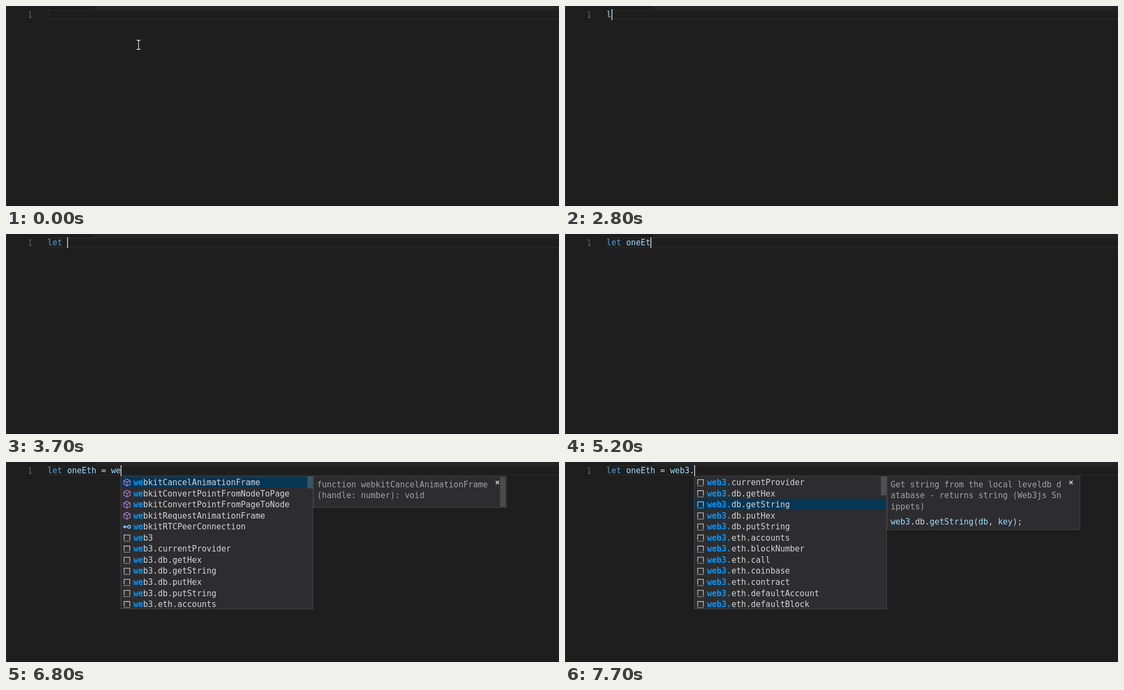
Animation of 1024x371 px, one loop 8 s. Source, as an HTML page:

```html
<!DOCTYPE html>
<html lang="en">
<head>
<meta charset="utf-8">
<title>Editor autocomplete</title>
<style>
  html, body { margin: 0; width: 100%; height: 100%; overflow: hidden; background: #1e1e1e; }
  svg { display: block; }
  text { font: 15px "DejaVu Sans Mono", monospace; white-space: pre; fill: #d4d4d4; }
  .match { font-weight: bold; fill: #0097fb; }
  .box { fill: #2d2d30; stroke: #454545; }
  .dim { fill: #a2a2a3; }
  .kw { fill: #569cd6; }
  .id { fill: #9cdcfe; }
</style>
</head>
<body>
<svg width="1024" height="371" viewBox="0 0 1024 371">
  <defs>
    <clipPath id="list"><rect x="1" y="27" width="355" height="245"/></clipPath>
    <g id="keyword" fill="none" stroke="#c5c5c5" stroke-width="1.4">
      <path d="M0 1.5H8M10 1.5H14M0 4.7H3M5 4.7H10M0 8H6M8 8H14M0 11.3H4M6 11.3H12"/>
    </g>
    <g id="field">
      <path d="M3 2H.7V11H3M11.5 2H13.8V11H11.5" fill="none" stroke="#c5c5c5" stroke-width="1.3"/>
      <path d="M3.5 6L8 3.2 11 4.6V7.2L6.5 9.8 3.5 8.4Z" fill="#75beff"/>
    </g>
    <g id="type" fill="none" stroke="#75beff" stroke-width="1.8">
      <circle cx="2.8" cy="6.5" r="2.6" fill="#75beff" stroke="none"/>
      <path d="M4 6.5H8"/><circle cx="11" cy="6.5" r="2.7"/>
    </g>
    <g id="method" fill="none" stroke="#b180d7" stroke-width="1.3">
      <path d="M7 .2L12.8 3.2V9.8L7 13 1.2 9.8V3.2ZM1.2 3.2L7 6.4 12.8 3.2M7 6.4V13"/>
    </g>
    <g id="snippet" fill="none" stroke="#c5c5c5" stroke-width="1.3">
      <path d="M1.7 10.5V1.2H12.3V10.5"/>
      <path d="M1 12.6H13" stroke-dasharray="1.6 1"/>
    </g>
  </defs>
  <rect width="1024" height="371" fill="#1e1e1e"/>
  <rect x="163" width="861" height="6" fill="#252526"/>
  <rect width="1" height="371" fill="#333"/>
  <rect y="370" width="1024" height="1" fill="#171116"/>
  <rect x="78.5" y="7.5" width="960" height="17" fill="none" stroke="#2d2d2d"/>
  <text x="40" y="22" style="fill:#5a5a5a">1</text>
  <g id="scene"></g>
</svg>
<script>
const LOOP = 8000, LEFT = 77, ADVANCE = 9.03, ROW = 20.55;
const scene = document.getElementById('scene');

// Each entry: icon, then label with the matched letters in brackets.
const letRows = [
  'keyword [let]', 'field [le]ng[t]h', 'type HTM[LTe]mplateElement', 'type HTM[LTe]xtAreaElement',
  'type WebG[LTe]xture', 'type [L]is[te]ningStateChangedEvent', 'type HTM[LT]ime[E]lement',
  'field screen[Le]f[t]', 'type HTM[LT]able[E]lement', 'type HTM[LT]itle[E]lement',
  'type HTM[LT]rack[E]lement', 'type SVGAnimated[Le]ng[t]h'
];
const kitRows = [
  'method webkitCancelAnimationFrame', 'method webkitConvertPointFromNodeToPage',
  'method webkitConvertPointFromPageToNode', 'method webkitRequestAnimationFrame',
  'type webkitRTCPeerConnection'
];
const web3Rows = [
  'web3', 'web3.currentProvider', 'web3.db.getHex', 'web3.db.getString', 'web3.db.putHex',
  'web3.db.putString', 'web3.eth.accounts', 'web3.eth.blockNumber', 'web3.eth.call',
  'web3.eth.coinbase', 'web3.eth.contract', 'web3.eth.defaultAccount', 'web3.eth.defaultBlock'
].map(s => 'snippet ' + s);

const prefixed = (rows, prefix) => rows.slice(0, 12).map(r => r.replace(' ' + prefix, ` [${prefix}]`));

const span = (cls, s) => `<tspan class="${cls}">${s}</tspan>`;
const text = (x, y, s, cls = '') => `<text x="${x}" y="${y}" class="${cls}">${s}</text>`;
const rect = (x, y, w, h, fill) => `<rect x="${x}" y="${y}" width="${w}" height="${h}" fill="${fill}"/>`;
const box = (x, w, h) => `<rect class="box" x="${x + .5}" y="26.5" width="${w}" height="${h}"/>`;

const getStringCode = span('id', 'web3') + '.db.' + span('id', 'getString') + '(' +
  span('id', 'db') + ', ' + span('id', 'key') + ');';
const details = {
  let: { h: 38, lines: ['let'] },
  kit: { h: 58, lines: ['function webkitCancelAnimationFrame', '(handle: number): void'], bar: true },
  get: {
    h: 99, code: getStringCode,
    lines: ['Get string from the local leveldb d', 'atabase - returns string (Web3js Sn', 'ippets)']
  }
};

const letMenu = { rows: letRows, pick: 0, thumb: 24 };
const kitMenu = prefix => ({
  rows: prefixed(kitRows.concat(web3Rows), prefix), pick: 0, thumb: 22, detail: details.kit
});

const steps = [
  { at: 0, pointer: [245.5, 72] },
  { at: 1400, pointer: [214.5, 205] },
  { at: 1500 },
  { at: 1800, caret: true },
  { at: 2300 },
  { at: 2800, code: 'l', caret: true },
  { at: 2900, code: 'le', caret: true },
  { at: 3000, code: 'let', caret: true },
  { at: 3100, code: 'let', caret: true, menu: letMenu },
  { at: 3200, code: 'let', caret: true, menu: { ...letMenu, detail: details.let } },
  ...[[3700, ''], [4000, 'o'], [4300, 'on'], [4500, 'one'], [4900, 'oneE'], [5200, 'oneEt'],
    [5300, 'oneEth'], [5500, 'oneEth '], [5800, 'oneEth ='], [5900, 'oneEth = ']]
    .map(([at, s]) => ({ at, code: 'let ' + s, caret: true })),
  { at: 6300, code: 'let oneEth = ', caret: true, error: true },
  { at: 6400, code: 'let oneEth = ', error: true },
  { at: 6500, code: 'let oneEth = w', caret: true, error: true },
  { at: 6600, code: 'let oneEth = w', caret: true, error: true, menu: kitMenu('w') },
  { at: 6800, code: 'let oneEth = we', caret: true, menu: kitMenu('we') },
  { at: 6900, code: 'let oneEth = web', caret: true, menu: kitMenu('web') },
  { at: 7300, code: 'let oneEth = web3', caret: true,
    menu: { rows: prefixed(web3Rows, 'web3'), pick: 3, thumb: 34, detail: details.get } },
  { at: 7700, code: 'let oneEth = web3.', caret: true,
    menu: { rows: prefixed(web3Rows.slice(1), 'web3.'), pick: 2, thumb: 35, detail: details.get } }
];

const paint = code => code.replace(/\w+/g, w => span(w === 'let' ? 'kw' : 'id', w));

function drawRow(row, i) {
  const [, icon, label] = row.match(/^(\w+) (.*)$/);
  const y = 27 + ROW * i;
  return `<use href="#${icon}" x="5" y="${y + 4.5}"/>` +
    text(24, y + 16, label.replace(/\[(.*?)\]/g, (_, m) => span('match', m)));
}

function drawDetail(d) {
  const x = 357;
  return box(x, 357, d.h) +
    d.lines.map((s, i) => text(x + 7, 47 + 20.4 * i, s, 'dim')).join('') +
    (d.code ? text(x + 7, 116, d.code) : '') +
    (d.bar ? rect(x + 346, 28, 10, 55, '#4b4b4c') : '') +
    `<path d="M${x + 338} 35l6 6m0 -6l-6 6" stroke="#c5c5c5" stroke-width="1.8"/>`;
}

function drawMenu(m, x) {
  return `<g transform="translate(${x})">` + box(0, 356, 246) + '<g clip-path="url(#list)">' +
    rect(1, 27 + ROW * m.pick, 355, ROW, '#073655') + m.rows.map(drawRow).join('') +
    rect(346, 27, 10, m.thumb, 'rgba(121,121,121,.45)') + '</g>' +
    (m.detail ? drawDetail(m.detail) : '') + '</g>';
}

function drawPointer([x, y]) {
  const d = `M${x - 3.5} ${y - 8.5}h2.5l1 1 1 -1h2.5M${x} ${y - 7.5}v15M${x - 3.5} ${y + 8.5}h2.5l1 -1 1 1h2.5`;
  return `<path d="${d}" fill="none" stroke="#000" stroke-width="3"/>` +
    `<path d="${d}" fill="none" stroke="#fff" stroke-width="1.3"/>`;
}

function draw({ code = '', caret, error, menu, pointer }) {
  const end = Math.floor(LEFT + ADVANCE * code.length);
  return text(LEFT, 21, paint(code)) +
    (error ? '<path d="M177 24.5l2 -2 2 2 2 -2 2 2" fill="none" stroke="#e51400" stroke-width="1.1"/>' : '') +
    (menu ? drawMenu(menu, end) : '') +
    (caret ? rect(end, 6, 2, 20, '#aeafad') : '') +
    (pointer ? drawPointer(pointer) : '');
}

let shown;
function tick() {
  const t = performance.now() % LOOP;
  const step = steps.findLast(s => s.at <= t);
  if (step !== shown) scene.innerHTML = draw(shown = step);
  requestAnimationFrame(tick);
}
tick();
</script>
</body>
</html>
```
